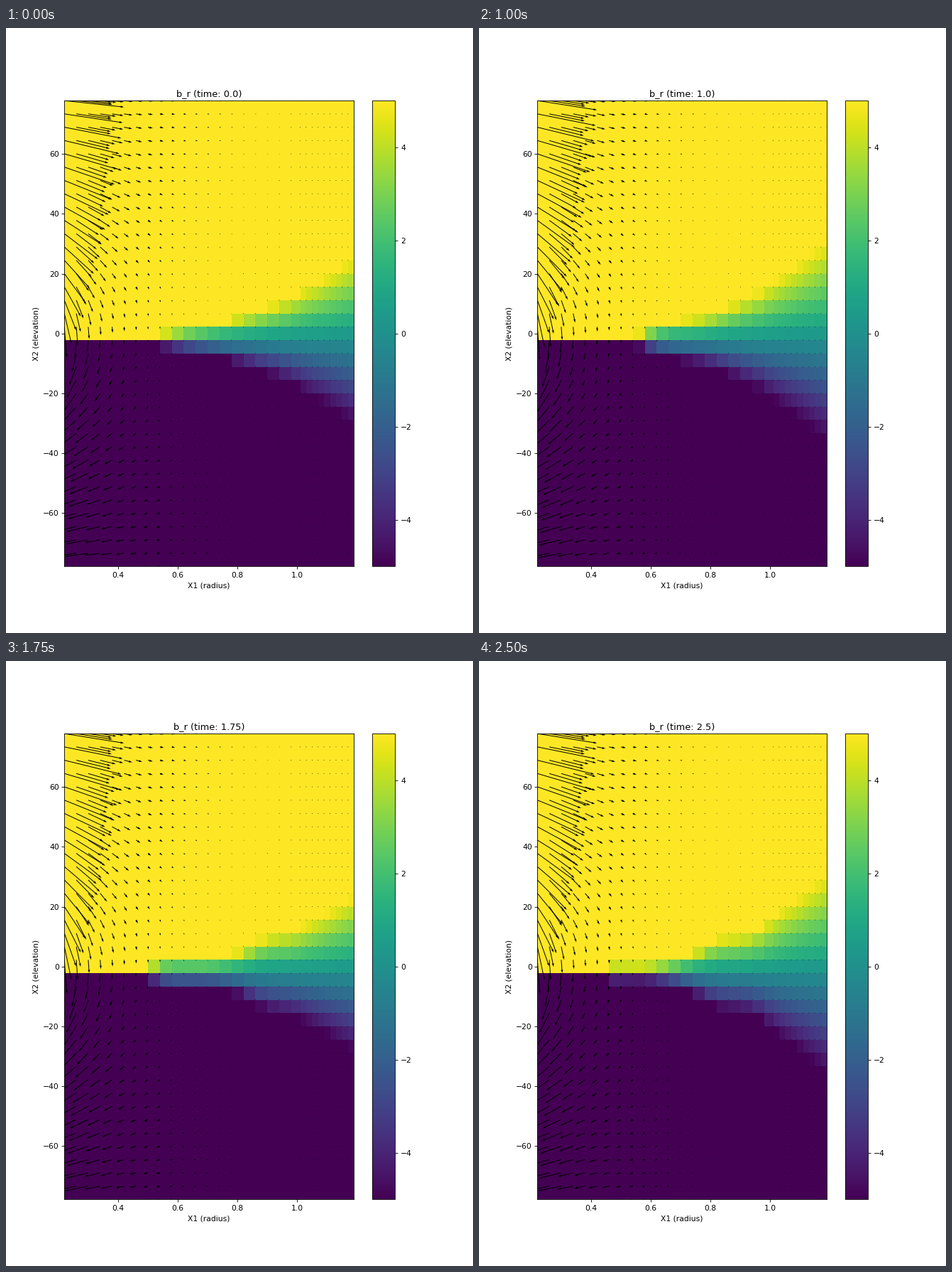
Animation, 658 px wide and 851 px high, one loop 2750 ms. Source, as a matplotlib script:

```python
import numpy as np
import matplotlib.pyplot as plt
from matplotlib.animation import FuncAnimation

WIDTH, HEIGHT, DPI = 658, 851, 77.4
FRAMES, STEP = 11, 0.25
STRENGTH = 17.5      # radial field of the dipole at r = 1 above the pole
WAVELENGTH, SPEED = 0.37, 0.34

radius = np.concatenate([0.22 + 0.04 * np.arange(20), 1.01 + 0.02 * np.arange(10)])
elevation = np.linspace(77.78, -77.78, 36)
R, E = np.meshgrid(radius, elevation)
sin_e, cos_e = np.sin(np.radians(E)), np.cos(np.radians(E))


def disturbance(r, t):
    """Outward wave in the inner disk, slow swing of the whole outer disk."""
    crest = 0.82 + SPEED * (t - 2)
    wave = 0.28 * (0.6 / r) * np.cos(2 * np.pi * (r - crest) / WAVELENGTH)
    swing = 0.13 * np.cos(2 * np.pi * (t - 1.75) / 1.2)
    front = min(0.9, 0.3 + 0.4 * t)
    inner = 1 / (1 + np.exp((r - front) / 0.04))
    growth = min(1, t) ** 3
    return 1 + growth * (inner * wave + (1 - inner) * swing - 0.07)


def radial_field(t):
    return (STRENGTH * sin_e / R**3 * disturbance(R, t))[:-1, :-1]


def arrows(t):
    drag = 0.1 * (1 - np.exp(-t / 0.35))
    return 2 * sin_e / R**3, -(cos_e + drag) / R**3


# The tiny margin keeps the pixel size from being rounded down.
fig, ax = plt.subplots(figsize=((WIDTH + 1e-6) / DPI, (HEIGHT + 1e-6) / DPI), dpi=DPI)
mesh = ax.pcolormesh(radius, elevation, radial_field(0), cmap="viridis",
                     vmin=-5, vmax=5, shading="flat")
fig.colorbar(mesh, ax=ax)

u, v = arrows(0)
scale = 1.8 * np.hypot(u, v).mean() * np.sqrt(u.size)
quiver = ax.quiver(R, E, u, v, scale=scale, scale_units="width")

ax.set_xlim(radius[0], radius[-1])
ax.set_ylim(elevation[-1], elevation[0])
ax.set_xlabel("X1 (radius)")
ax.set_ylabel("X2 (elevation)")
title = ax.set_title("b_r (time: 0.0)")


def update(i):
    t = i * STEP
    mesh.set_array(radial_field(t))
    quiver.set_UVC(*arrows(t))
    title.set_text(f"b_r (time: {t})")
    return mesh, quiver, title


anim = FuncAnimation(fig, update, frames=FRAMES, interval=250, repeat=True, repeat_delay=0)
plt.show()
```
